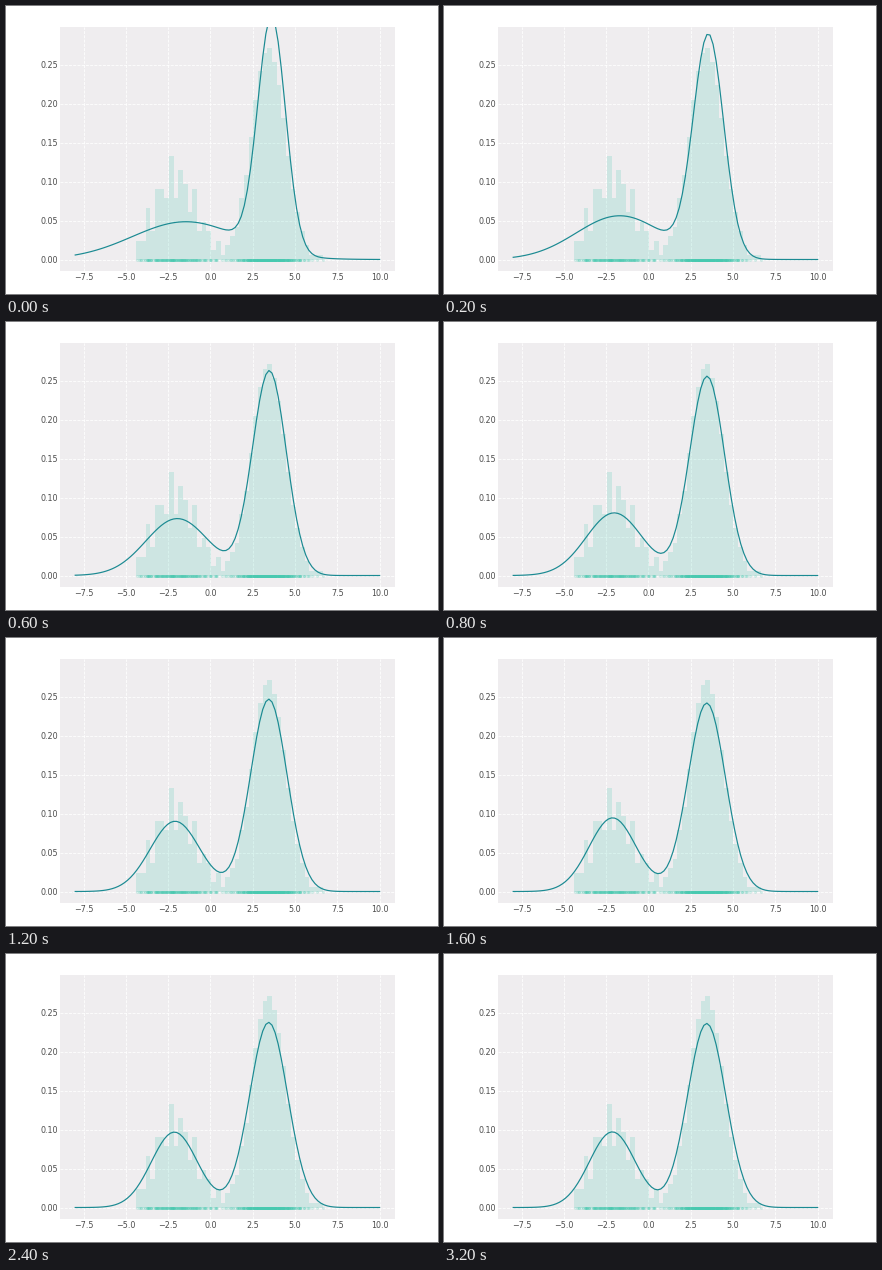
Recreate the animation shown at these times as a matplotlib script. Size 432 px wide and 288 px high, loop 3.4 s.

```python
import numpy as np
import matplotlib.pyplot as plt
from matplotlib.animation import FuncAnimation

WIDTH, HEIGHT, DPI = 432, 288, 72
FRAMES, INTERVAL = 17, 200
SAMPLES, BINS = 600, 40
MINT, TEAL, PANEL, TEXT = "#48c9b0", "#1b8a92", "#efedef", "#4d4d4d"

plt.rcParams["font.family"] = "DejaVu Sans"


def normal(x, mean, std):
    return np.exp(-0.5 * ((x - mean) / std) ** 2) / (std * np.sqrt(2 * np.pi))


def settle(start, limit, rate, step):
    return limit + (start - limit) * np.exp(-rate * step)


def mixture(x, step):
    """Two-component density whose parameters converge as the fit iterates."""
    weight = settle(0.386, 0.3295, 0.53, step)
    left = normal(x, settle(-1.45, -2.14, 0.45, step),
                  np.sqrt(settle(10.1, 1.835, 0.54, step)))
    right = normal(x, settle(3.62, 3.44, 0.48, step),
                   settle(0.82, 1.136, 0.29, step))
    return weight * left + (1 - weight) * right


def bin_counts(centres, width):
    """Expected counts per bin, with a ragged left hump."""
    left = SAMPLES * width * 0.33 * normal(centres, -2.1, 1.25)
    right = SAMPLES * width * 0.67 * normal(centres, 3.42, 0.98)
    ragged = 1.2 * np.sqrt(left) * np.cos(3.8 * np.arange(BINS) - 1.65)
    return np.maximum(1, np.rint(left + right + ragged)).astype(int)


fig = plt.figure(figsize=(WIDTH / DPI, HEIGHT / DPI), dpi=DPI, facecolor="white")
ax = fig.add_axes([0.125, 23.4 / HEIGHT, 0.775, 244 / HEIGHT], facecolor=PANEL)
ax.set(xlim=(-8.9, 10.9), ylim=(-0.014225, 0.298725),
       xticks=np.arange(-7.5, 10.1, 2.5), yticks=np.arange(0, 0.26, 0.05))
ax.spines[:].set_visible(False)
ax.tick_params(length=0, pad=1.9, labelsize=8, labelcolor=TEXT)
ax.grid(color="white", linestyle="--", linewidth=0.8)
ax.set_axisbelow(True)

edges = np.linspace(-4.38, 6.67, BINS + 1)
width = edges[1] - edges[0]
counts = bin_counts(edges[:-1] + width / 2, width)
ax.bar(edges[:-1], counts / (SAMPLES * width), width=width, align="edge",
       color=MINT, alpha=0.2, linewidth=0)

rng = np.random.default_rng(7)
rug = np.repeat(edges[:-1], counts) + width * rng.random(counts.sum())
ax.plot(rug, np.zeros_like(rug), "o", color=MINT, alpha=0.2,
        markersize=3, markeredgewidth=0)

xs = np.linspace(-8, 10, 100)
curve, = ax.plot(xs, mixture(xs, 0), color=TEAL, linewidth=1.2)


def update(step):
    curve.set_ydata(mixture(xs, step))
    return curve,


animation = FuncAnimation(fig, update, frames=FRAMES, interval=INTERVAL,
                          repeat=True, repeat_delay=0)
plt.show()
```
